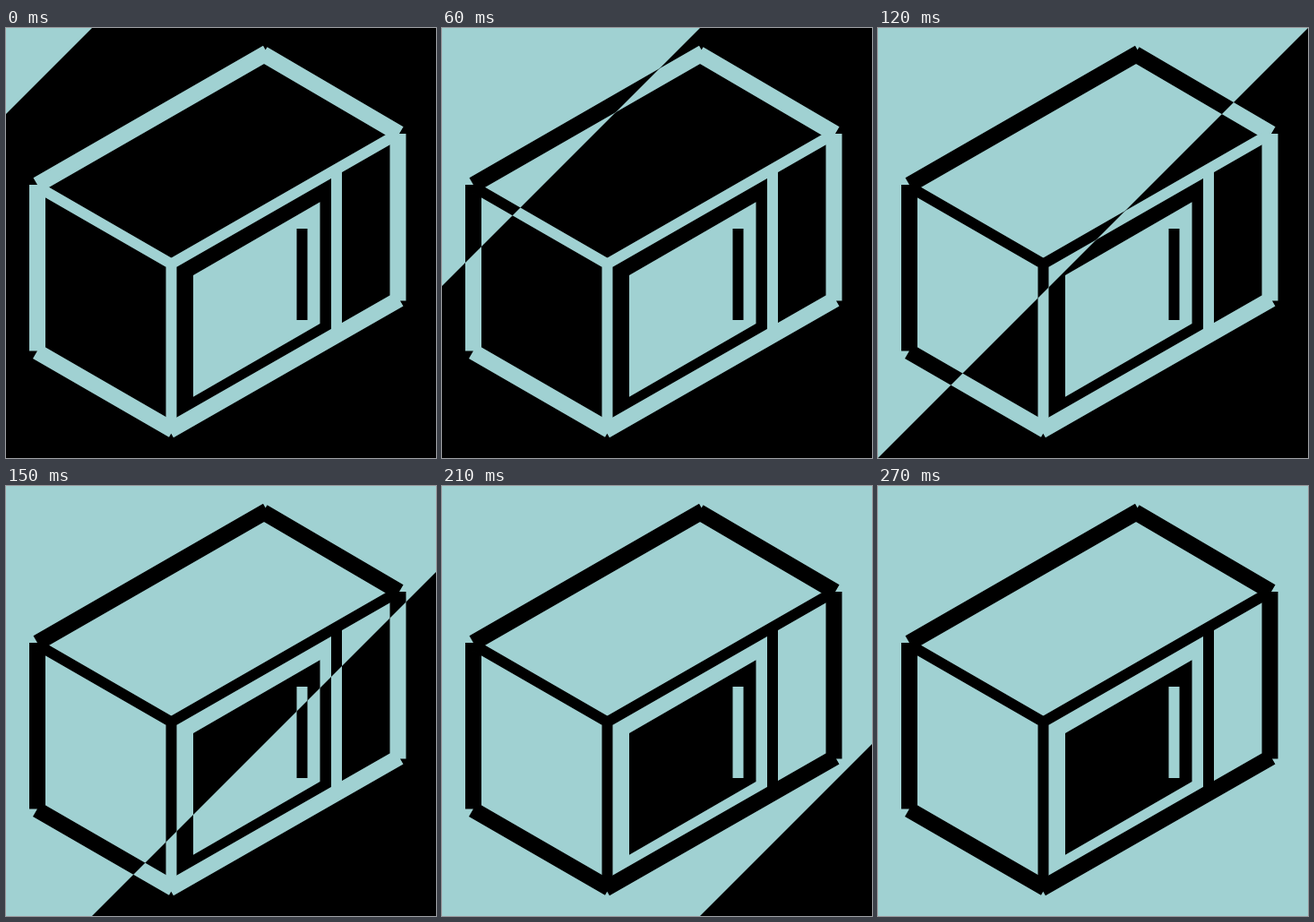
Animation, 480 px wide and 480 px high, one loop 300 ms. Source, as an HTML page:

```html
<!DOCTYPE html>
<html lang="en">
<head>
<meta charset="utf-8">
<title>Microwave wipe</title>
<style>
  :root { --ink: #a0d1d2; }
  html, body { margin: 0; height: 100%; overflow: hidden; background: #000; }
  svg { display: block; width: 100vw; height: 100vh; isolation: isolate; }
  .lines { fill: none; stroke: var(--ink); }
  .thick { stroke-width: 18; }
  .thin { stroke-width: 12; }
  .pane { fill: var(--ink); }
  /* Difference with the ink colour swaps ink and black under the wipe. */
  .wipe {
    fill: var(--ink);
    mix-blend-mode: difference;
    animation: sweep 300ms steps(10) infinite;
  }
  @keyframes sweep { to { transform: translateX(960px); } }
</style>
</head>
<body>
<svg viewBox="0 0 480 480">
  <rect width="480" height="480"/>
  <path class="lines thick" d="
    M35 175L291.5 27.6 M287 29L439 118 M437.5 118V304.5
    M439 302.8L182.5 449.5 M186.5 449L34.5 361.2 M35 360.5V175"/>
  <path class="lines thin" d="
    M36 177.7L184.5 263.4L438 118 M184.5 263V449 M369 157.5V342"/>
  <path class="pane" d="M209 276L350.5 194.3V330L209 411.7Z"/>
  <rect x="324.5" y="224" width="12" height="102"/>
  <path class="wipe" d="M-960 -960H1056L-960 1056Z"/>
</svg>
</body>
</html>
```
